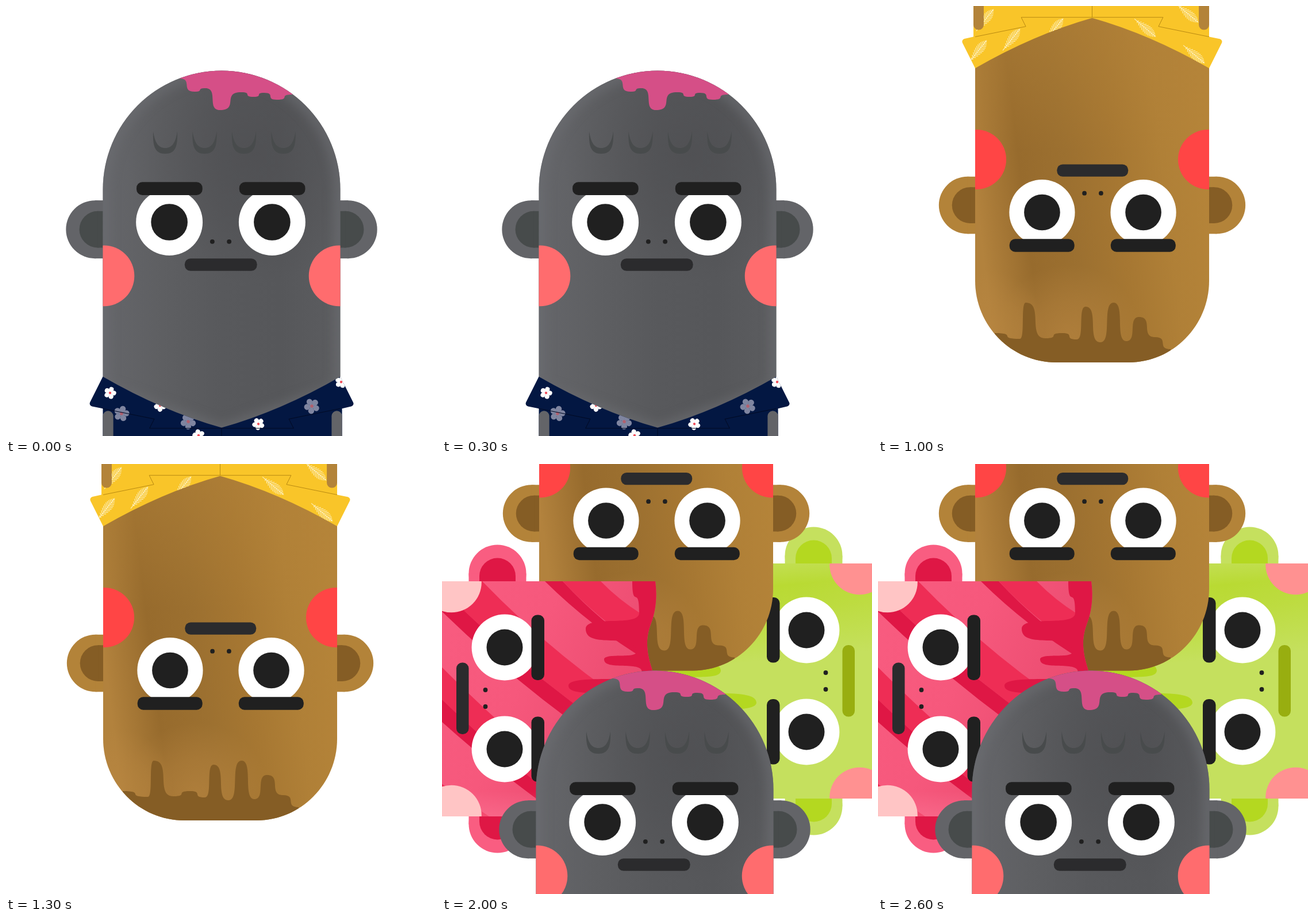
Recreate the animation shown at these times as an HTML page with a canvas. Size 748x748 px, loop 3 s.

```html
<!DOCTYPE html>
<html lang="en">
<head>
<meta charset="utf-8">
<title>Four heads</title>
<style>
html, body { margin: 0; width: 100%; height: 100%; overflow: hidden; background: #fff; }
canvas { display: block; width: 748px; height: 748px; }
</style>
</head>
<body>
<canvas id="stage" width="748" height="748"></canvas>
<script>
const ctx = document.getElementById('stage').getContext('2d');
const SIZE = 748, TAU = Math.PI * 2, INK = '#202020', LIP = '#2b2b2d';
const HALF = 204.5; // half the width of a head

function dot(x, y, r, color) {
  ctx.fillStyle = color;
  ctx.beginPath();
  ctx.arc(x, y, r, 0, TAU);
  ctx.fill();
}

function bar(x, y, w, h, r, color) {
  ctx.fillStyle = color;
  ctx.beginPath();
  ctx.roundRect(x, y, w, h, r);
  ctx.fill();
}

function fillPath(path, color) {
  ctx.fillStyle = color;
  ctx.fill(path);
}

function at(x, y, angle, draw) {
  ctx.save();
  ctx.translate(x, y);
  ctx.rotate(angle);
  draw();
  ctx.restore();
}

// Linear gradient over the whole stage with evenly spaced colours.
function wash(x0, y0, x1, y1, ...colors) {
  const g = ctx.createLinearGradient(x0, y0, x1, y1);
  colors.forEach((c, i) => g.addColorStop(i / (colors.length - 1), c));
  ctx.fillStyle = g;
  ctx.fillRect(0, 0, SIZE, SIZE);
}

function glow(x, y, r, rgb, alpha) {
  const g = ctx.createRadialGradient(x, y, 0, x, y, r);
  g.addColorStop(0, `rgba(${rgb},${alpha})`);
  g.addColorStop(0.5, `rgba(${rgb},${alpha * 0.6})`);
  g.addColorStop(1, `rgba(${rgb},0)`);
  ctx.fillStyle = g;
  ctx.fillRect(x - r, y - r, 2 * r, 2 * r);
}

// Dripping edge: S-curves between the tips and valleys, closed at the crown.
function drips(sideways, crown, points) {
  const path = new Path2D();
  const xy = (along, depth) => sideways ? [depth, along] : [along, depth];
  let last;
  for (const [px, py] of points) {
    const [along, depth] = sideways ? [py, px] : [px, py];
    if (last) {
      const reach = (along - last[0]) * 0.92;
      path.bezierCurveTo(...xy(last[0] + reach, last[1]), ...xy(along - reach, depth), px, py);
    } else {
      path.moveTo(...xy(along, crown));
      path.lineTo(px, py);
    }
    last = [along, depth];
  }
  path.lineTo(...xy(last[0], crown));
  return path;
}

// Diagonal band between two slightly sagging edges.
function band(color, upper, lower) {
  const sag = ([x0, y0, x1, y1]) => [
    (x0 + x1) / 2 - (y1 - y0) * 0.06, (y0 + y1) / 2 + (x1 - x0) * 0.06];
  const [x0, y0, x1, y1] = upper, [x2, y2, x3, y3] = lower;
  ctx.fillStyle = color;
  ctx.beginPath();
  ctx.moveTo(x0, y0);
  ctx.quadraticCurveTo(...sag(upper), x1, y1);
  ctx.lineTo(x3, y3);
  ctx.quadraticCurveTo(...sag(lower), x2, y2);
  ctx.fill();
}

// Shirt prints
function daisy(r, petal, heart) {
  return (x, y) => at(x, y, x, () => {
    for (let i = 0; i < 5; i++) {
      const a = i * TAU / 5;
      dot(Math.cos(a) * r * 0.6, Math.sin(a) * r * 0.6, r * 0.37, petal);
    }
    dot(0, 0, r * 0.35, petal);
    dot(0, 0, r * 0.2, heart);
  });
}

function cactus(scale, inside) {
  const body = new Path2D('M-18 0H16M-6 0V-8Q-6 -12 -2 -12H10M0 0V8Q0 12 4 12H14');
  return (x, y) => at(x, y, 0, () => {
    ctx.scale(scale, scale);
    ctx.lineCap = 'round';
    for (const [width, color] of [[8.5, '#fff'], [6.7, inside]]) {
      ctx.lineWidth = width;
      ctx.strokeStyle = color;
      ctx.stroke(body);
    }
  });
}

function feather(len) {
  return (x, y) => at(x, y, x < SIZE / 2 ? -0.9 : 0.7, () => {
    ctx.strokeStyle = '#fdeeb8';
    ctx.lineWidth = 1.2;
    ctx.beginPath();
    ctx.moveTo(-len * 0.65, 0);
    ctx.lineTo(len / 2, 0);
    for (let k = 0; k <= 1; k += 1 / 12) {
      const px = (k - 0.5) * len, w = Math.sin(Math.PI * (0.1 + k * 0.9)) * len * 0.18;
      for (const side of [-1, 1]) {
        ctx.moveTo(px, 0);
        ctx.lineTo(px + w * 0.8, w * side);
      }
    }
    ctx.stroke();
  });
}

function lily(r) {
  return (x, y) => at(x, y, x, () => {
    ctx.strokeStyle = 'rgba(240,250,240,.85)';
    ctx.lineWidth = 1;
    for (let i = 0; i < 5; i++) {
      ctx.rotate(TAU / 5);
      ctx.beginPath();
      ctx.moveTo(0, 0);
      ctx.quadraticCurveTo(r * 0.5, -r * 0.5, r, 0);
      ctx.quadraticCurveTo(r * 0.5, r * 0.5, 0, 0);
      ctx.lineTo(r * 0.7, 0);
      ctx.stroke();
    }
  });
}

const scatter = (draw, ...spots) => spots.forEach(([x, y]) => draw(x, y));

// x, y: middle of the eye line; shift: head centre from there; neck, arm: distance below the eyes.
const gray = {
  x: 373.5, y: 376, turn: 0, scale: 1.01, shift: 1.5, neck: 266, arm: 325,
  skin: '#636468', inner: '#474b4b', cheek: '#ff6c6e', shirt: '#031742', seam: '#010b26', mouth: LIP,
  head: new Path2D('M168.5 665V319A206.5 206.5 0 0 1 581.5 319V665L375 740Z'),
  hairColor: '#d54f87',
  hair: drips(false, 100, [[301, 126], [328, 149], [347, 143], [372, 181], [409, 150],
    [431, 158], [449, 151], [471, 163], [498, 154]]),
  paint() {
    wash(169, 0, 581, 0, '#65666a', '#5e5f62', '#58595c', '#56575a', '#5c5d60');
    glow(430, 260, 220, '70,70,73', 0.4);
    ctx.filter = 'blur(9px)';
    ctx.strokeStyle = 'rgba(108,109,113,.7)';
    ctx.lineWidth = 22;
    ctx.stroke(this.head);
    ctx.filter = 'none';
    const scale = new Path2D('M-21 0C-22 26 -18 39 0 39C18 39 22 26 21 0C18 20 12 29 0 29C-12 29 -18 20 -21 0Z');
    for (let i = 0; i < 4; i++) at(277 + i * 68.5, 218, 0, () => fillPath(scale, '#484b4c'));
  },
  print() {
    scatter(daisy(11, '#fff', '#f0505c'), [181, 673], [268, 695], [439, 727], [335, 747], [583, 654]);
    scatter(daisy(14, '#7f85a0', '#b0606f'), [201, 709], [317, 723], [532, 696]);
  }
};

const pink = {
  x: 402, y: 398.5, turn: TAU / 4, scale: 1, shift: 1, neck: 248, arm: 319,
  skin: '#f95d81', inner: '#df1745', cheek: '#ffc5c5', shirt: '#ab0035', seam: '#4a0018', mouth: LIP,
  head: new Path2D('M100 195H664C668 225 664 250 656 270C645 300 651 325 658 347C667 378 665 410 656 437C643 468 641 492 649 520C658 543 667 556 665 578C664 590 658 600 651 604H100L55 400Z'),
  hairColor: '#df1745',
  hair: drips(true, 700, [[624, 195], [636, 250], [543, 278], [631, 318], [575, 331], [641, 353],
    [513, 377], [628, 403], [541, 416], [629, 455], [646, 490]]),
  paint() {
    const mid = '#ee2d55', dark = '#df1745';
    wash(200, 300, 640, 480, '#f95d81', '#f6587c', '#e8486d');
    band(dark, [503, 195, 650, 320], [472, 195, 650, 333]);
    band(mid, [569, 195, 640, 252], [503, 195, 640, 310]);
    band(mid, [363, 195, 660, 437], [280, 195, 660, 502]);
    band(dark, [280, 195, 660, 502], [250, 205, 660, 535]);
    band(mid, [156, 195, 595, 604], [135, 232, 535, 604]);
    band(dark, [135, 232, 535, 604], [112, 257, 500, 604]);
    band(mid, [75, 355, 375, 604], [80, 435, 270, 604]);
    band(dark, [80, 435, 270, 604], [95, 475, 248, 604]);
    glow(570, 520, 130, '190,60,95', 0.15);
    wash(0, 560, 0, 606, 'rgba(255,130,160,0)', 'rgba(255,130,160,.4)');
  },
  print() {
    scatter(cactus(1.05, '#fff'), [112, 220], [14, 460], [122, 571], [-8, 298]);
    scatter(cactus(0.6, '#fff'), [78, 541]);
    scatter(cactus(1.1, this.shirt), [38, 342], [50, 584]);
    scatter(cactus(0.7, this.shirt), [40, 212], [92, 293], [92, 499]);
  }
};

const brown = {
  x: 373.5, y: 359, turn: TAU / 2, scale: 0.995, shift: 1, neck: 252, arm: 319,
  skin: '#b38339', inner: '#855d25', cheek: '#ff4545', shirt: '#f9c529', seam: '#b98a12', mouth: LIP,
  head: new Path2D('M169 90V478C169 556 232 620 310 620H436C513 620 576 556 576 478V90L372 15Z'),
  hairColor: '#855d25',
  hair: drips(false, 640, [[203, 569], [247, 579], [257, 516], [291, 578], [320, 569], [346, 580],
    [361, 523], [387, 585], [410, 516], [432, 583], [454, 541], [482, 576], [509, 597]]),
  paint() {
    wash(169, 320, 576, 270, '#b2823d', '#976b2d', '#9c7030', '#a67732', '#b08037', '#b58439');
    wash(0, 20, 0, 250, 'rgba(179,131,57,.5)', 'rgba(179,131,57,0)');
    glow(330, 580, 130, '186,135,66', 0.65);
    glow(190, 560, 100, '186,135,66', 0.5);
  },
  print() {
    scatter(feather(42), [176, 76], [188, 22], [234, 56], [309, 38], [467, 40], [552, 86], [541, 15]);
  }
};

const green = {
  x: 421, y: 377.5, turn: -TAU / 4, scale: 1, shift: 0, neck: 249, arm: 321,
  skin: '#c5e05e', inner: '#b4d820', cheek: '#ff9191', shirt: '#003b04', seam: '#001a02', mouth: '#98ae10',
  head: new Path2D('M690 173H176A15 15 0 0 0 161 188V567A15 15 0 0 0 176 582H690L775 377Z'),
  hairColor: '#b4d820',
  hair: drips(true, 150, [[161, 260], [190, 297], [311, 316], [190, 334], [272, 359], [196, 382],
    [334, 415], [200, 440], [277, 473], [227, 500], [333, 541], [222, 582]]),
  paint() {
    wash(330, 173, 350, 385, '#c3df55', '#b9da33', '#bcdb3c', '#c0de4c', '#c5e05e', '#c5e05e');
    wash(400, 0, 740, 0, 'rgba(197,224,94,0)', 'rgba(197,224,94,.45)');
  },
  print() {
    scatter(lily(17), [713, 157], [707, 222], [741, 275], [717, 508], [714, 580], [750, 474]);
  }
};

function shirtPath(n) {
  const p = new Path2D(), h = HALF, flap = h + 25;
  p.moveTo(0, n + 88);
  p.quadraticCurveTo(-h / 2, n + 59, -h, n);
  p.arcTo(-flap, n + 50, -h, n + 55, 5);
  p.lineTo(-h, n + 55);
  p.lineTo(-h, n + 400);
  p.lineTo(h + 3, n + 400);
  p.lineTo(h + 3, n + 55);
  p.arcTo(flap, n + 50, h, n, 5);
  p.lineTo(h, n);
  p.quadraticCurveTo(h / 2, n + 59, 0, n + 88);
  return p;
}

function drawShirt(c, base) {
  const n = c.neck, cut = shirtPath(n);
  fillPath(cut, c.shirt);
  ctx.save();
  ctx.clip(cut);
  ctx.setTransform(base);
  c.print();
  ctx.restore();
  ctx.strokeStyle = c.seam;
  ctx.lineWidth = 1;
  ctx.stroke(new Path2D(`M${-HALF} ${n + 55}L-116 ${n + 73}L-124 ${n + 89}H124L116 ${n + 73}L${HALF} ${n + 55}M0 ${n + 89}V${n + 400}`));
  for (const x of [-HALF, HALF - 15]) bar(x, c.arm, 18, 300, 9, c.skin);
}

function drawEars(c) {
  for (const s of [-1, 1]) {
    for (const [r, out, color] of [[50, 13.5, c.skin], [31.5, 9, c.inner]]) {
      dot(s * (HALF + out), 12.5, r, color);
      ctx.fillRect(s < 0 ? -HALF - out : HALF - 4, 12.5 - r, out + 4, 2 * r);
    }
  }
}

function drawFace(c) {
  for (const x of [-88.5, 88.5]) {
    dot(x, 0, 57.4, '#fff');
    dot(x, 0, 31.5, INK);
    bar(x - 56.5, -69, 113.5, 22.5, 10, INK);
  }
  for (const x of [-14.5, 14.5]) dot(x, 33.5, 3.9, INK);
  bar(-62, 62.5, 124.5, 21.5, 10, c.mouth);
}

function drawPerson(c, dx = 0, dy = 0) {
  ctx.save();
  ctx.translate(dx, dy);
  const base = ctx.getTransform();
  const layer = (shift, draw) => at(c.x, c.y, c.turn, () => {
    ctx.scale(c.scale, c.scale);
    ctx.translate(shift, 0);
    draw();
  });

  layer(c.shift, () => drawEars(c));
  ctx.save();
  ctx.clip(c.head);
  c.paint();
  fillPath(c.hair, c.hairColor);
  layer(c.shift, () => {
    for (const s of [-1, 1]) dot(s * (HALF - 2), 92.5, 52.3, c.cheek);
  });
  ctx.restore();
  layer(0, () => drawFace(c));
  layer(c.shift, () => drawShirt(c, base));
  ctx.restore();
}

const scenes = [
  () => drawPerson(gray),
  () => drawPerson(pink),
  () => drawPerson(brown),
  () => drawPerson(green),
  () => {
    drawPerson(green, 213, 0);
    drawPerson(brown, 0, -260.5);
    drawPerson(pink, -293, 9);
    drawPerson(gray, -5, 247);
  }
];

const start = performance.now();
let shown = -1;

function tick() {
  const t = (performance.now() - start) % 3000;
  const next = Math.min(4, Math.floor(t / 500));
  if (next !== shown) {
    shown = next;
    ctx.fillStyle = '#fff';
    ctx.fillRect(0, 0, SIZE, SIZE);
    scenes[next]();
  }
  requestAnimationFrame(tick);
}
tick();
</script>
</body>
</html>
```
